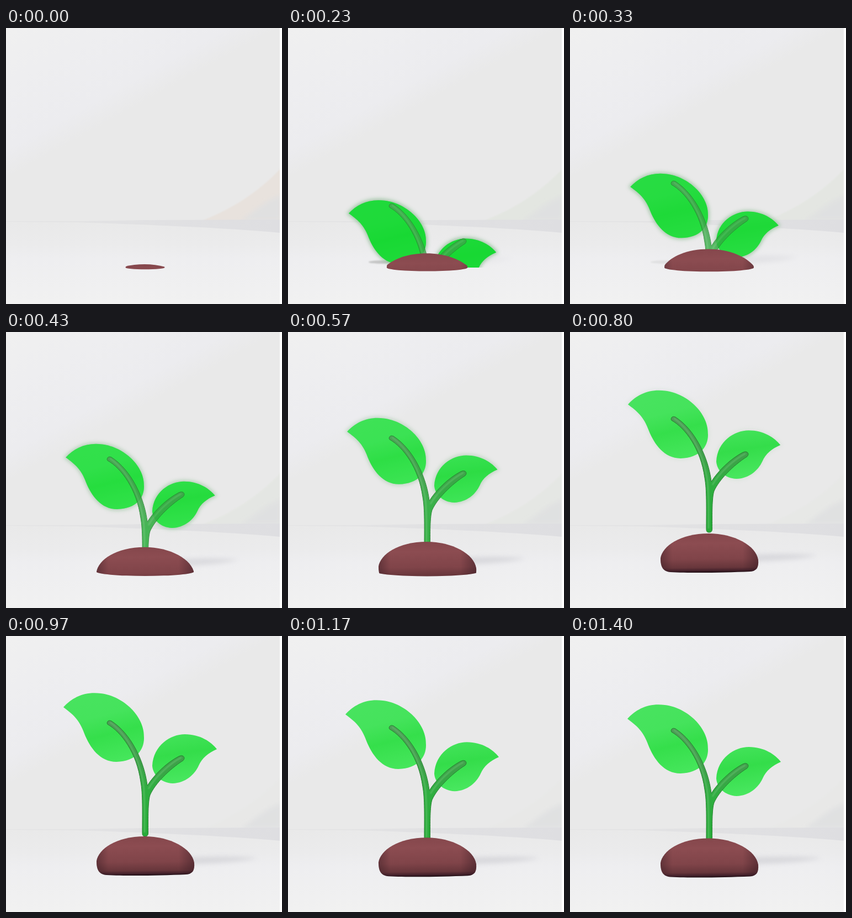
Recreate the animation shown at these times as an HTML page. Size 500x500 px, loop 1430 ms.

```html
<!DOCTYPE html>
<html lang="en">
<head>
<meta charset="utf-8">
<title>Sprout</title>
<style>
html, body { margin: 0; width: 100%; height: 100%; overflow: hidden; background: #fff; }
svg { display: block; }
#root { width: 100vw; height: 100vh; }
.halo { fill: #8fbd95; stroke: #8fbd95; stroke-width: 5; filter: url(#soft); }
.tint { fill: #08d626; }
</style>
</head>
<body>
<svg id="root" viewBox="0 0 500 500">
<defs>
  <linearGradient id="wall" gradientUnits="userSpaceOnUse" x1="0" y1="0" x2="144" y2="261">
    <stop offset="0" stop-color="#f0f0f0"/><stop offset=".3" stop-color="#eeeef0"/>
    <stop offset=".65" stop-color="#ececef"/><stop offset=".8" stop-color="#e9e9e9"/>
  </linearGradient>
  <linearGradient id="floor" x1="0" y1="0" x2="0" y2="1">
    <stop offset="0" stop-color="#e9e9e9"/><stop offset=".28" stop-color="#ebebec"/>
    <stop offset=".45" stop-color="#eeeef0"/><stop offset="1" stop-color="#f1f1f1"/>
  </linearGradient>
  <linearGradient id="band">
    <stop offset="0" stop-color="#dedee0" stop-opacity=".5"/><stop offset="1" stop-color="#dedee1"/>
  </linearGradient>
  <linearGradient id="leafA" x1=".3" y1="0" x2=".6" y2="1">
    <stop offset="0" stop-color="#48e35f"/><stop offset=".35" stop-color="#45e35c"/>
    <stop offset=".62" stop-color="#35df4b"/><stop offset="1" stop-color="#45e65b"/>
  </linearGradient>
  <linearGradient id="leafB" x1=".3" y1="0" x2=".5" y2="1">
    <stop offset="0" stop-color="#43e35a"/><stop offset=".4" stop-color="#34dd4a"/>
    <stop offset="1" stop-color="#4ae861"/>
  </linearGradient>
  <linearGradient id="stemFill" x1="0" y1="0" x2="0" y2="1">
    <stop offset="0" stop-color="#4e9a57"/><stop offset=".35" stop-color="#3fa04a"/>
    <stop offset=".6" stop-color="#2fae40"/><stop offset="1" stop-color="#28ab39"/>
  </linearGradient>
  <linearGradient id="soil" x1=".47" y1="0" x2=".5" y2="1">
    <stop offset="0" stop-color="#85474c"/><stop offset=".25" stop-color="#8c4c51"/>
    <stop offset=".65" stop-color="#804449"/><stop offset=".87" stop-color="#67363b"/>
    <stop offset=".95" stop-color="#42202a"/><stop offset="1" stop-color="#1c0e13"/>
  </linearGradient>
  <linearGradient id="soilSide">
    <stop offset="0" stop-color="#301820" stop-opacity=".4"/><stop offset=".12" stop-color="#301820" stop-opacity="0"/>
    <stop offset=".84" stop-color="#301820" stop-opacity="0"/><stop offset="1" stop-color="#301820" stop-opacity=".45"/>
  </linearGradient>
  <filter id="soft" filterUnits="userSpaceOnUse" x="-50" y="-50" width="600" height="650"><feGaussianBlur stdDeviation="4"/></filter>
  <filter id="fine" filterUnits="userSpaceOnUse" x="-50" y="-50" width="600" height="600"><feGaussianBlur stdDeviation="1.2"/></filter>
  <path id="pathA" d="M104 129C120 111 143 100 172 104C213 109 252 146 250 185C250 206 236 227 200 228C170 228 152 202 142 177C133 151 120 141 104 129Z"/>
  <path id="pathB" d="M382 205C372 192 352 178 324 178C298 178 267 198 265 235C266 251 280 266 302 267C325 266 341 252 349 235C355 221 366 212 382 205Z"/>
  <path id="pathS" d="M184 160C209 174 237 212 244 264C248 285 247 320 247 358Q247 363 252 363Q257 363 257.5 358C257.5 330 257 300 261 288C270 268 295 242 321 225.5Q325 221 321 217.5Q318 215.5 313 218C290 230 268 252 256 271C251 228 227 177 191 154Q186 152 184 155Q182 158 184 160Z"/>
  <path id="pathM" d="M164 415C167 393 200 370 251 370C298 370 337 392 341 418C342 432 338 438 326 439C280 441 220 442 182 440C168 439 164 430 164 415Z"/>
  <clipPath id="above"><rect width="500" height="434"/></clipPath>
  <clipPath id="soilClip"><path id="rim"/></clipPath>
</defs>
<svg width="496" height="500">
  <rect width="496" height="351" fill="url(#wall)"/>
  <path id="corner" d="M355 349C405 330 455 300 500 252V349Z" filter="url(#fine)"/>
  <path d="M425 349C450 333 470 312 500 302V349Z" fill="#dfe0e1" opacity=".85" filter="url(#soft)"/>
  <rect y="350" width="496" height="150" fill="url(#floor)"/>
  <path d="M0 350L130 350L250 348L496 347V371C400 362 250 356 130 352L0 351Z" fill="url(#band)"/>
  <path id="shade" fill="#cfcfd4" filter="url(#soft)"/>
  <ellipse id="leftShade" cx="170" cy="424" rx="24" ry="3" fill="#a9aaa9" filter="url(#fine)"/>
  <g clip-path="url(#above)">
    <g id="A">
      <use href="#pathA" class="halo"/>
      <use href="#pathA" fill="url(#leafA)"/><use href="#pathA" class="tint"/>
    </g>
    <g id="B">
      <use href="#pathB" class="halo"/>
      <use href="#pathB" fill="url(#leafB)"/><use href="#pathB" class="tint"/>
    </g>
    <g id="stem">
      <use href="#pathS" fill="url(#stemFill)" stroke="#26822f" stroke-width="1"/>
      <path d="M188 156C216 175 239 214 248 262C252 285 251 320 251 356M318 220C296 231 270 256 258 277" fill="none" stroke="#74c97d" stroke-width="2" opacity=".6" filter="url(#fine)"/>
    </g>
  </g>
  <g clip-path="url(#soilClip)">
    <g id="mound"><use href="#pathM" fill="url(#soil)"/><use href="#pathM" fill="url(#soilSide)"/></g>
  </g>
</svg>
</svg>
<script>
const LOOP = 1430, STEP = 40, FIRST = 70, PEAK = 970, GROUND = 434;
const el = id => document.getElementById(id);
const set = (id, name, value) => el(id).setAttribute(name, value);
const fade = (name, value) => document.querySelectorAll(name).forEach(n => n.setAttribute('opacity', value));
const clamp = x => Math.min(1, Math.max(0, x));

// Falls from 1 to 0 between two times, slowing down for powers above 1.
const remain = (t, from, to, power) => (1 - clamp((t - from) / (to - from))) ** power;

// Height of a part: it rises to its peak, then sinks back by a small drop.
const height = (t, { peak, rise, from = 0, to, power, drop }) =>
  peak + rise * remain(t, from, to, power) + drop * (1 - remain(t, PEAK, 1400, 1.8));

const LEFT = { peak: 104, rise: 380, to: 850, power: 1.9, drop: 21 };
const RIGHT = { peak: 178, rise: 377, to: 800, power: 1.82, drop: 23 };
const STEM = { peak: 157, rise: 313, to: 800, power: 1.89, drop: 14 };
const SOIL = { peak: 363, rise: 65, from: 40, to: 850, power: 1.35, drop: 3.5 };

const hold = t => t < FIRST ? 0 : FIRST + Math.floor((t - FIRST) / STEP) * STEP;

function place(id, y, top, sx = 1, sy = 1, pivot = 0) {
  set(id, 'transform', `translate(${pivot} ${y}) scale(${sx} ${sy}) translate(${-pivot} ${-top})`);
}

function draw(time) {
  const t = hold(time);
  const low = remain(t, 0, 900, 1);
  const sx = 1 - .055 * low, sy = 1 - .1 * low;
  const tint = clamp(1.3 * low - .35);

  place('A', height(t, LEFT), 104, sx, sy, 250);
  place('B', height(t, RIGHT), 178, sx, sy, 265);
  place('stem', height(t, STEM), 157);
  set('stem', 'opacity', 1 - .4 * tint);
  fade('.halo', Math.min(.9, 1.15 * low));
  fade('.tint', tint);

  // The ground cuts the mound along a flat ellipse that widens as it rises.
  const top = height(t, SOIL);
  const r = 96 * Math.sqrt(1 - ((top - SOIL.peak) / 70) ** 2);
  place('mound', top, 370);
  set('rim', 'd', `M${252 - r} ${GROUND}A${r} ${1.5 * (GROUND - top)} 0 0 1 ${252 + r} ${GROUND}`
    + `A${r} ${.09 * r} 0 0 1 ${252 - r} ${GROUND}Z`);

  const x = 456 - 65 * low, y = 402 + 20 * low;
  set('shade', 'd', `M300 ${y}Q${x - 50} ${y - 5} ${x} ${y}Q${x - 40} ${y + 10} 300 ${y + 12}Z`);
  set('shade', 'opacity', Math.min(.7, clamp(1.7 - 2 * low)));
  set('leftShade', 'opacity', clamp(.6 - Math.abs(t - 230) / 200));

  const warm = t < FIRST;
  set('corner', 'fill', warm ? '#e8e2dd' : '#e1e5de');
  set('corner', 'opacity', warm ? 1 : .1 + .8 * low);
}

const start = performance.now();
function tick() {
  draw((performance.now() - start) % LOOP);
  requestAnimationFrame(tick);
}
draw(0);
requestAnimationFrame(tick);
</script>
</body>
</html>
```
